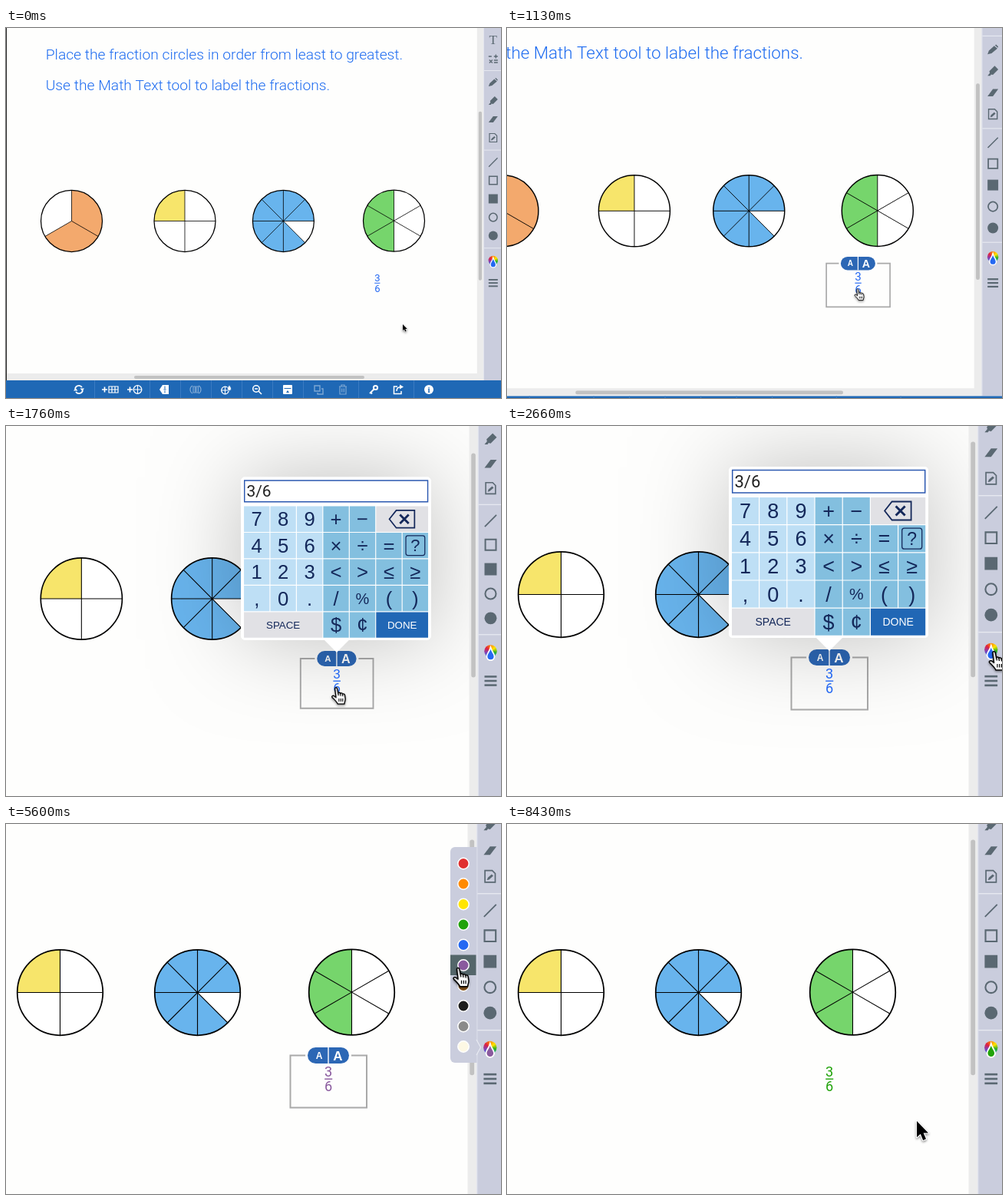
These frames come from a looping animation (645x482 px, 9160 ms). An HTML page with a canvas:

```html
<!DOCTYPE html>
<html lang="en">
<head>
<meta charset="utf-8">
<title>Fraction circles</title>
<style>
html, body { margin: 0; width: 100%; height: 100%; overflow: hidden; background: #fefefd; }
canvas { display: block; }
</style>
</head>
<body>
<canvas id="stage" width="645" height="482"></canvas>
<script>
const ctx = document.getElementById('stage').getContext('2d');
const LOOP = 9160, ZOOM = 1.3945, PIVOT = { x: 645, y: 332.5 };
const SANS = '"Liberation Sans", Arial, sans-serif', ROBOTO = 'Roboto, sans-serif';
const INK = '#5a6872', PANEL = '#cacddd', BAR = '#1f68b5', NAVY = '#14285a';
const PALETTE = ['#e03030', '#ff8a00', '#ffe500', '#21a30a', '#2468f2',
  '#8a5a9e', '#87541b', '#1c1c1c', '#8a8a8a', '#fdf8e4'];
const GREEN = 3, BLUE = 4, PURPLE = 5;

const clamp = v => Math.min(1, Math.max(0, v));
const ease = (v, power) => v < .5 ? (2 * v) ** power / 2 : 1 - (2 - 2 * v) ** power / 2;

// Scales everything around the pivot; `base` is the zoom at which the coordinates were laid out.
function view(scale, base) {
  const k = scale / base;
  ctx.setTransform(k, 0, 0, k, PIVOT.x * (1 - k), PIVOT.y * (1 - k));
}
function rect(x, y, w, h, fill, radius = 0) {
  ctx.fillStyle = fill;
  ctx.beginPath();
  ctx.roundRect(x, y, w, h, radius);
  ctx.fill();
}
function frame(x, y, w, h, color, width, radius = 0) {
  ctx.strokeStyle = color;
  ctx.lineWidth = width;
  ctx.beginPath();
  ctx.roundRect(x, y, w, h, radius);
  ctx.stroke();
}
function disc(x, y, r, fill, stroke, width) {
  ctx.beginPath();
  ctx.arc(x, y, r, 0, 2 * Math.PI);
  if (fill) { ctx.fillStyle = fill; ctx.fill(); }
  if (stroke) { ctx.strokeStyle = stroke; ctx.lineWidth = width; ctx.stroke(); }
}
function shape(x, y, d, fill, stroke, width = 1) {
  const path = new Path2D(d);
  ctx.save();
  ctx.translate(x, y);
  if (fill) { ctx.fillStyle = fill; ctx.fill(path); }
  if (stroke) { ctx.strokeStyle = stroke; ctx.lineWidth = width; ctx.stroke(path); }
  ctx.restore();
}
function text(str, x, y, font, fill, align = 'center') {
  ctx.font = font;
  ctx.fillStyle = fill;
  ctx.textAlign = align;
  ctx.fillText(str, x, y);
}

// A fraction circle: `from` and `to` count slices clockwise from the top.
function fractionCircle(x, y, slices, from, to, fill) {
  const r = 40, angle = i => i / slices * 2 * Math.PI - Math.PI / 2;
  disc(x, y, r, '#fff');
  ctx.fillStyle = fill;
  ctx.beginPath();
  ctx.moveTo(x, y);
  ctx.arc(x, y, r, angle(from), angle(to));
  ctx.fill();
  ctx.strokeStyle = '#000';
  ctx.lineWidth = .8;
  ctx.beginPath();
  for (let i = 0; i < slices; i++) {
    ctx.moveTo(x, y);
    ctx.lineTo(x + r * Math.cos(angle(i)), y + r * Math.sin(angle(i)));
  }
  ctx.stroke();
  disc(x, y, r, null, '#000', 1.25);
}

function page() {
  rect(0, 0, 1, 459, '#222');
  const title = '300 19.25px ' + ROBOTO;
  text('Place the fraction circles in order from least to greatest.', 51.7, 41, title, '#1d6bf0', 'left');
  text('Use the Math Text tool to label the fractions.', 51.7, 81, title, '#1d6bf0', 'left');
  fractionCircle(85.5, 251.5, 3, 0, 2, '#f3a96d');
  fractionCircle(233, 251.5, 4, 3, 4, '#f7e56b');
  fractionCircle(361.4, 251.5, 8, 3, 10, '#68b4ed');
  fractionCircle(505.5, 251.2, 6, 3, 6, '#76d56c');
}

function fractionLabel(color) {
  const font = '13px ' + ROBOTO;
  text('3', 483.8, 329.7, font, color);
  text('6', 483.8, 343.7, font, color);
  rect(480.2, 331.8, 7.2, 1, color);
}

function scrollbars() {
  rect(1, 450, 622, 9, '#ececec');
  rect(167, 453, 300, 4, '#c2c2c2', 2);
  rect(613.8, 0, 9, 459, '#ececec');
  rect(615.8, 108.7, 4.2, 220, '#c2c2c2', 2);
}

function toolbar(color) {
  const x = 634.8;
  rect(622.4, 0, 23, 459, PANEL);
  rect(622.2, 0, .8, 459, '#e4e7f0');
  for (const y of [55, 158.6, 286.2]) rect(623, y, 22, 1, '#e6e8f0');
  text('T', x, 21, '17px "Liberation Serif", serif', INK);
  shape(x, 40, 'M-6-3h4M1-3h5M3.5-5.5v5M-5 1.5l4 4M-1 1.5l-4 4M1 2h5M1 5h5', null, INK, 1.3);
  shape(x, 71, 'M-6 5L-4.5 1 1.5-4.5 5-1.5-1.5 4zM2.4-5.2L3.6-6 6-3.6 5.4-2.3z', INK);
  shape(x, 95, 'M-6 5L-3.5 2-4 0 2-6 6-2 0 4-2 3.5-3 5zM-4.5 1L-1 4', INK);
  shape(x, 119, 'M-6 4L0-4H6L0 4z', INK);
  shape(x, 143, 'M-4.8-5.5H2L4.8-2.7V5.5H-4.8z', null, INK, 1.2);
  shape(x, 143.5, 'M-3 3L-2 .5 1.5-2.5 3-1-1 2.5z', INK);
  shape(x, 175, 'M-5.7 5.7L5.7-5.7', null, INK, 1.3);
  frame(x - 5.2, 193.3, 10.5, 10.5, INK, 1.5);
  rect(x - 6, 216.5, 12, 12, INK);
  disc(x, 246.6, 5.3, null, INK, 1.5);
  disc(x, 270.6, 6, INK);

  const wheel = ctx.createConicGradient(-Math.PI / 2, x, 303);
  ['#ff8a00', '#ffe500', '#30b020', '#19a5b8', '#2468f2', '#8a3fae', '#e02040', '#ff8a00']
    .forEach((c, i) => wheel.addColorStop(i / 7, c));
  disc(x, 303, 6.2, wheel);
  const drop = 'M0-1.5C1 1.5 3.1 3.5 3.1 5.6A3.1 3.1 0 0 1-3.1 5.6C-3.1 3.5-1 1.5 0-1.5z';
  shape(x, 302.6, drop, '#fff', '#fff', 2.6);
  shape(x, 302.6, drop, color);
  for (const y of [327, 331.2, 335.4]) rect(x - 6, y, 12, 1.9, INK);
}

function bottomBar() {
  const y = 471, W = '#fff', dim = 'rgba(255,255,255,.42)';
  rect(0, 459, 645, 30, BAR);
  for (const x of [115, 187, 227, 267, 307, 347, 387, 459, 531]) rect(x, 459, 1, 23, '#3b7cc2');
  shape(95, y, 'M-5-1A5 5 0 0 1 4-3M5 1A5 5 0 0 1-4 3', null, W, 1.7);
  shape(95, y, 'M1.5-1.5H7L4.5 2zM-1.5 1.5H-7L-4.5-2z', W);
  for (const x of [128.5, 161.5]) shape(x, y, 'M-3.5 0h7M0-3.5v7', null, W, 1.7);
  shape(140, y, 'M-6-4H6V4H-6zM-2-4V4M2-4V4M-6 0H6', null, W, 1.2);
  disc(171.5, y, 5.3, null, W, 1.3);
  shape(171.5, y, 'M-5 0H5M0-5V5', null, W, 1);
  shape(206, y, 'M-6 0L-2-6H6V6H-2z', W);
  shape(207, y, 'M0-4.5V-1M-1.5 0H1.5M0 1.5V4.5', null, BAR, 1);
  shape(247, y, 'M-4-5C-8-3-8 3-4 5M4-5C8-3 8 3 4 5M-3-4h2.5v8H-3zM1-4h2.5v8H1z', null, dim, 1.2);
  disc(285.5, y + 1, 4.8, null, W, 1.3);
  shape(285.5, y + 1, 'M-5 0H5M0-5V5', null, W, 1);
  shape(291, y - 2, 'M0-4C1-2 2.5-1 2.5 1A2.5 2.5 0 0 1-2.5 1C-2.5-1-1-2 0-4z', W, BAR, .8);
  disc(326, y - 1, 4.2, null, W, 1.6);
  shape(326, y - 1, 'M3 3L7 7M-2 0H2', null, W, 1.6);
  rect(361, y - 6, 12, 12, W, 1);
  rect(362.5, y - 2, 9, 1, BAR);
  shape(367, y + 2, 'M-2 2L0-1 2 2z', BAR);
  shape(407, y, 'M-5-5H2V2H-5zM4-1H6V6H-1V4', null, dim, 1.4);
  shape(439, y, 'M-5-4H5M-2-4V-6H2V-4M-4-4V6H4V-4M-1.3-1.5V3.5M1.3-1.5V3.5', null, dim, 1.2);
  disc(481.5, y - 2.5, 2.6, null, W, 2);
  shape(479, y, 'M1-1L-5 5M-4 3.5L-2 5.5', null, W, 1.8);
  shape(511, y, 'M-1-4H-5.5V5.5H4V2M-2 2C-2-2 1-3.5 4-3.5', null, W, 1.5);
  shape(511, y, 'M2-6.5L7-3.5 2-.5z', W);
  disc(551, y, 6, W);
  text('i', 551, y + 4, 'bold 11px "Liberation Serif", serif', BAR);
}

function editBox() {
  frame(370.5, 301.5, 99.5, 68, '#a9a9a9', 2);
  rect(390, 290, 60, 23, '#fefefd', 11.5);
  rect(393, 291, 54, 21, '#2c67b5', 10.5);
  rect(419.3, 291, 1.4, 21, '#fff');
  text('A', 408, 306, 'bold 12px ' + SANS, '#fff');
  text('A', 432.5, 308, 'bold 17px ' + SANS, '#fff');
}

function keypad(scale) {
  ctx.save();
  ctx.shadowColor = 'rgba(0,0,0,.25)';
  ctx.shadowBlur = 120 * scale / ZOOM;
  rect(289, 53, 260, 223, '#fff', 5);
  ctx.restore();
  shape(420, 275, 'M-18 0H18L0 18z', '#fff');
  rect(289, 53, 260, 223, '#fff', 5);
  frame(293.7, 57.6, 251, 29.3, '#2b58b0', 1.5);
  text('3/6', 296.5, 79.8, '22px ' + ROBOTO, '#222', 'left');

  const pitch = 36.2, gap = 1.2;
  const left = col => 293 + col * pitch, top = row => 93 + row * pitch;
  const centerX = (col, span) => left(col) + (span * pitch - gap) / 2;
  const centerY = row => top(row) + (pitch - gap) / 2;
  const key = (col, row, span, fill) =>
    rect(left(col), top(row), span * pitch - gap, pitch - gap, fill);
  ['789+−', '456×÷=?', '123<>≤≥', ',0./%()', '   $¢'].forEach((keys, row) => {
    [...keys].forEach((label, col) => {
      if (label === ' ') return;
      const size = label === '%' ? 21 : label === '?' ? 23 : 27;
      key(col, row, 1, col < 3 ? '#bedff5' : '#83bfdf');
      text(label, centerX(col, 1), centerY(row) + size * .35, size + 'px ' + SANS, NAVY);
    });
  });
  frame(centerX(6, 1) - 13, centerY(1) - 13.5, 26, 27, NAVY, 1.3, 3);
  key(5, 0, 2, '#e1e1e5');
  shape(centerX(5, 2), centerY(0), 'M-17.5 0L-8-12H17V12H-8z', null, NAVY, 1.8);
  shape(centerX(5, 2) + 3, centerY(0), 'M-6-6L6 6M6-6L-6 6', null, NAVY, 3);
  key(0, 4, 3, '#e1e1e5');
  key(5, 4, 2, '#2167b5');
  text('SPACE', centerX(0, 3), centerY(4) + 5, '14px ' + SANS, NAVY);
  text('DONE', centerX(5, 2), centerY(4) + 5, '14px ' + SANS, '#fff');
}

function colorMenu(selected) {
  rect(579, 30, 34.5, 281, PANEL, [6, 0, 0, 6]);
  shape(613, 291, 'M0-10L5.5 0 0 10', PANEL, '#e8eaf2', 1.2);
  rect(579, 117.5 + (selected - GREEN) * 26.5, 33.5, 26.5, '#54666a');
  PALETTE.forEach((color, i) => disc(596, 51.5 + i * 26.5, 7.2, color, '#fff', 1.5));
}

const MOVES = [ // start, end, x, y
  [0, 700, 419, 341.5], [1850, 2680, 634.5, 294], [3110, 4140, 589, 188],
  [5570, 6110, 589, 135], [7670, 8210, 534, 387]
];
function cursor(t, zoomed) {
  let x = 466.5, y = 407;
  for (const [start, end, toX, toY] of MOVES) {
    const p = ease(clamp((t - start) / (end - start)), 2.4);
    x += (toX - x) * p;
    y += (toY - y) * p;
  }
  const arrow = t < 420 || (t > 7670 && x < 579), size = .54 + .46 * zoomed;
  ctx.save();
  ctx.translate(x, y);
  ctx.scale(size, size);
  ctx.lineJoin = 'round';
  ctx.shadowColor = 'rgba(0,0,0,.35)';
  ctx.shadowBlur = 3;
  ctx.shadowOffsetY = 1.5;
  if (arrow) {
    const d = 'M0 0V21L4.8 16.8 8.2 25 12 23.3 8.6 15.5H15z';
    shape(0, 0, d, '#fff', '#fff', 2.4);
    ctx.shadowColor = 'transparent';
    shape(0, 0, d, '#000');
  } else {
    shape(-7, -1, 'M5.5 3C5 0 8.5 0 9 2.5L10.3 9C11 7.5 13.2 7.8 13.5 9.5 14.5 8.2 16.6 8.8 16.8 10.4 ' +
      '18 9.4 20 10.2 20.2 12L21 17C21.2 20 20 21 19.5 25H9.5C8.5 22 4 18 1.5 15.5 0 13.8 2.2 12 4 13L7 15.2z',
      '#fff', '#000', 1.5);
    ctx.shadowColor = 'transparent';
    shape(-7, -1, 'M10.3 9L10.8 12.5M13.5 9.5L14 13M16.8 10.4L17.2 13.5M11.5 17V21.5M14.3 17V21.5M17 17V21.5',
      null, '#000', 1.2);
  }
  ctx.restore();
}

function draw(t) {
  const zoomed = ease(clamp(t / 2490), 2), scale = 1 + (ZOOM - 1) * zoomed;
  const chosen = delay => t < 4560 + delay ? BLUE : t < 6360 + delay ? PURPLE : GREEN;
  const color = PALETTE[chosen(40)];

  ctx.setTransform(1, 0, 0, 1, 0, 0);
  rect(0, 0, 645, 482, '#fefefd');
  view(scale, 1);
  page();
  view(scale, ZOOM);
  if (t >= 900 && t < 8430) editBox();
  if (t >= 1400 && t < 2960) keypad(scale);
  view(scale, 1);
  fractionLabel(color);
  scrollbars();
  toolbar(color);
  bottomBar();
  view(scale, ZOOM);
  if (t >= 2960 && t < 8430) colorMenu(chosen(0));
  cursor(t, zoomed);
}

const started = performance.now();
function tick() {
  draw((performance.now() - started) % LOOP);
  requestAnimationFrame(tick);
}
tick();
</script>
</body>
</html>
```
